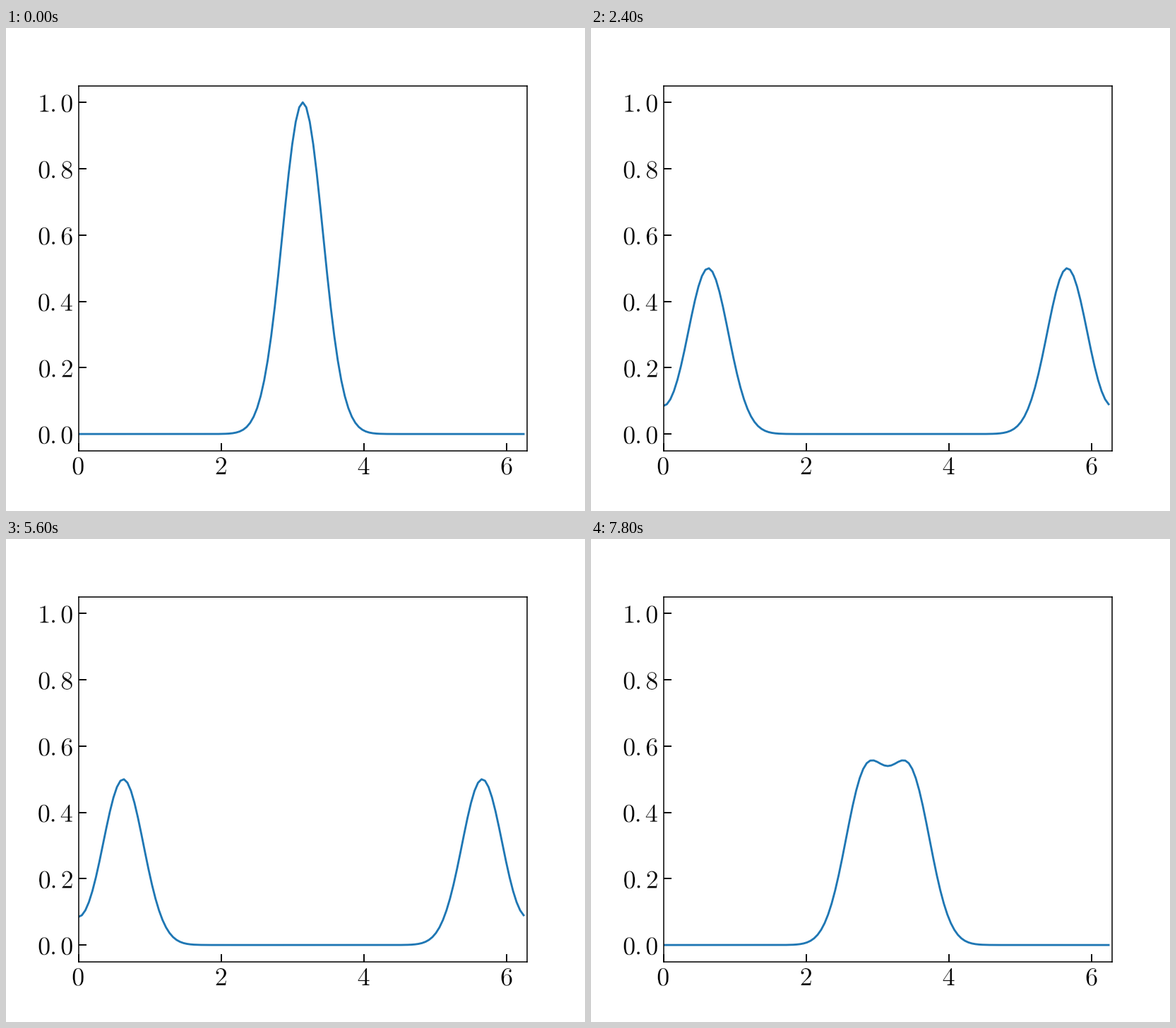
Recreate the animation shown at these times as a matplotlib script. Size 820 by 683 pixels, loop 8000 ms.

```python
import numpy as np
import matplotlib.pyplot as plt
from matplotlib import patheffects
from matplotlib.animation import FuncAnimation

W, H, DPI = 820, 683, 128
PX = 72 / DPI            # points per pixel
FRAMES, INTERVAL = 40, 200
STEP = np.pi / 10        # distance travelled per frame

plt.rcParams["mathtext.fontset"] = "cm"

fig = plt.figure(figsize=(W / DPI, H / DPI), dpi=DPI, facecolor="white")
ax = fig.add_axes([102.5 / W, 85.417 / H, 635.5 / W, 515.917 / H])
ax.set_xlim(0, 2 * np.pi)
ax.set_ylim(-0.05, 1.05)

for spine in ax.spines.values():
    spine.set_linewidth(1.52 * PX)
ax.tick_params(direction="in", length=11.4 * PX, width=1.9 * PX,
               pad=6.64 * PX, labelsize=36.4 * PX)


def decimal_label(v):
    whole, part = f"{v:.1f}".split(".")
    kern = r"\hspace{-0.04}"
    return f"${whole}{kern}.{kern}{part}$"


xticks = [0, 2, 4, 6]
yticks = np.arange(6) / 5
ax.set_xticks(xticks, [f"${v}$" for v in xticks])
ax.set_yticks(yticks, [decimal_label(v) for v in yticks])

# a hairline white edge gives the digits a lighter weight
thin = [patheffects.Stroke(linewidth=0.3 * PX, foreground="white")]
for label in ax.get_xticklabels() + ax.get_yticklabels():
    label.set_path_effects(thin)

x = np.linspace(0, 2 * np.pi, 128, endpoint=False)
line, = ax.plot(x, np.zeros_like(x), color="#1f77b4", lw=2.85 * PX)


def pulse(center):
    """Gaussian bump on the periodic interval [0, 2 pi)."""
    d = (x - center + np.pi) % (2 * np.pi) - np.pi
    return np.exp(-(d / 0.4) ** 2)


def update(i):
    shift = i * STEP
    line.set_ydata((pulse(np.pi - shift) + pulse(np.pi + shift)) / 2)
    return line,


anim = FuncAnimation(fig, update, frames=FRAMES, interval=INTERVAL,
                     init_func=lambda: update(0), repeat=True, repeat_delay=0)
plt.show()
```
